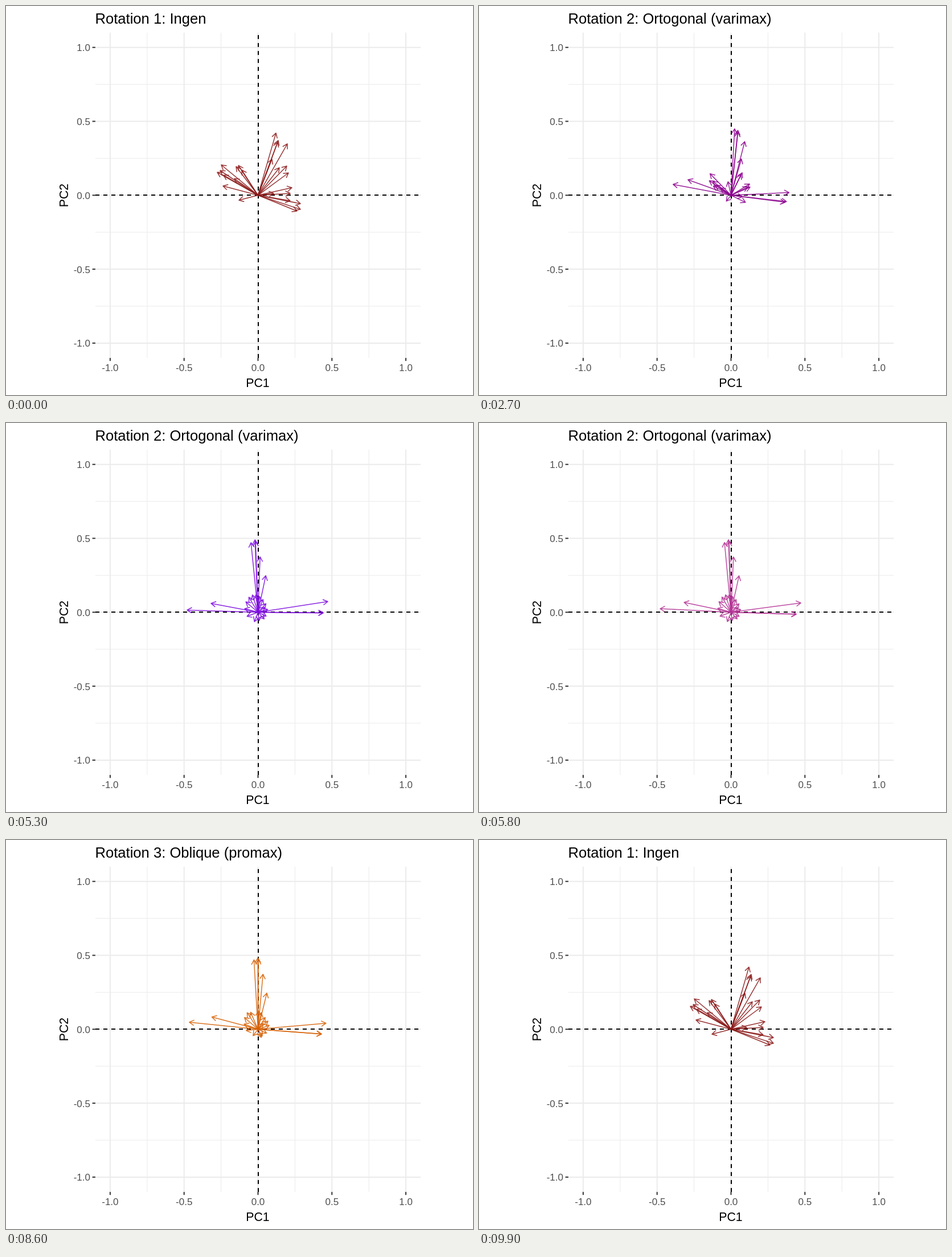
Recreate the animation shown at these times as an HTML page. Size 820x683 px, loop 10000 ms.

```html
<!DOCTYPE html>
<html lang="da">
<head>
<meta charset="utf-8">
<title>Rotation</title>
<style>
  html, body { margin: 0; width: 100%; height: 100%; overflow: hidden; background: #fff; }
  svg { display: block; width: 820px; height: 683px; font-family: "Liberation Sans", Arial, sans-serif; }
  .major { stroke: #ebebeb; stroke-width: 2; }
  .minor { stroke: #ebebeb; stroke-width: 1; }
  .tick { stroke: #333; stroke-width: 2; }
  .zero { stroke: #000; stroke-width: 2; stroke-dasharray: 7 7; shape-rendering: crispEdges; }
  .label { font-size: 17px; fill: #4d4d4d; }
  .axis { font-size: 21.3px; }
  .heading { font-size: 25.6px; }
  #arrows path { fill: none; stroke-width: 1.5; stroke-opacity: .88; stroke-linejoin: round; }
</style>
</head>
<body>
<svg id="chart" viewBox="0 0 820 683"></svg>
<script>
const CX = 442.5, CY = 332.3, UNIT = 259.6, HALF = 285.6;
const LEFT = CX - HALF, RIGHT = CX + HALF, TOP = CY - HALF, BOTTOM = CY + HALF;
const HEAD = 9.6, HEAD_ANGLE = Math.PI / 6;
const FRAME = 100, LOOP_FRAMES = 100, HOLD = 19, MOVE = 14, CYCLE = 33;

// Long arrows: tip before and after the orthogonal rotation.
const longArrows = [
  [[474, 223], [430, 210]], [[478, 236], [437, 205]], [[477, 239], [438, 208]],
  [[494, 242], [446, 235]], [[467, 269], [456, 268]],
  [[517, 347], [565, 313]], [[517, 357], [557, 333]], [[511, 360], [557, 333]],
  [[376, 289], [360, 317]], [[371, 292], [318, 329]]
];

// Short arrows: first tips, in the order in which they later fan out around the centre.
const shortTips = [
  [499, 342], [470, 329], [496, 293], [502, 319], [499, 329], [480, 284], [493, 281], [381, 316],
  [378, 279], [382, 297], [401, 303], [404, 282], [408, 280], [409, 341], [414, 288]
];

// The fan is densest and longest near the vertical axis.
function fanTip(index) {
  const j = index - (shortTips.length - 1) / 2;
  const angle = (108 + 12 * j + j ** 2 + 0.45 * j ** 3) * Math.PI / 180;
  const radius = 14 + 18 * Math.exp(-((j / 4) ** 2));
  return [CX + radius * Math.cos(angle), CY - radius * Math.sin(angle)];
}

// The oblique solution is a slight shear of the orthogonal one.
const shear = ([x, y]) => [x - 0.02 * (y - CY), y + 0.055 * (x - CX)];

const unrotated = [...longArrows.map(pair => pair[0]), ...shortTips];
const orthogonal = [...longArrows.map(pair => pair[1]), ...shortTips.map((_, i) => fanTip(i))];

const states = [
  { title: "Rotation 1: Ingen", color: "#8b1a1a", tips: unrotated },
  { title: "Rotation 2: Ortogonal (varimax)", color: "#6a00ee", tips: orthogonal },
  { title: "Rotation 3: Oblique (promax)", color: "#dc6600", tips: orthogonal.map(shear) }
];

const chart = document.getElementById("chart");

function add(parent, tag, attrs = {}, text = "") {
  const node = document.createElementNS("http://www.w3.org/2000/svg", tag);
  for (const name in attrs) node.setAttribute(name, attrs[name]);
  node.textContent = text;
  return parent.appendChild(node);
}

const line = (cls, x1, y1, x2, y2) => add(chart, "line", { class: cls, x1, y1, x2, y2 });
const label = (cls, x, y, anchor, text, extra) =>
  add(chart, "text", { class: cls, x, y, "text-anchor": anchor, ...extra }, text);

function gridPair(cls, value) {
  const x = CX + value * UNIT, y = CY - value * UNIT;
  line(cls, x, TOP, x, BOTTOM);
  line(cls, LEFT, y, RIGHT, y);
}

const majors = [-1, -0.5, 0, 0.5, 1];
[-0.75, -0.25, 0.25, 0.75].forEach(v => gridPair("minor", v));
majors.forEach(v => gridPair("major", v));
line("zero", LEFT, 332, RIGHT, 332);
line("zero", 443, BOTTOM, 443, TOP);

const arrowGroup = add(chart, "g", { id: "arrows" });
const arrows = unrotated.map(() => add(arrowGroup, "path"));

for (const v of majors) {
  const x = CX + v * UNIT, y = CY - v * UNIT;
  line("tick", x, BOTTOM, x, BOTTOM + 5.3);
  line("tick", LEFT - 5.3, y, LEFT, y);
  label("label", x, 641, "middle", v.toFixed(1));
  label("label", 148, y + 6.5, "end", v.toFixed(1));
}
label("axis", 442, 669, "middle", "PC1");
label("axis", 0, 0, "middle", "PC2", { transform: "translate(108.5 332.5) rotate(-90)" });
const heading = label("heading", 156.5, 31, "start", "");

function arrowPath([x, y]) {
  const angle = Math.atan2(y - CY, x - CX);
  const wing = turn =>
    `${x - HEAD * Math.cos(angle + turn)} ${y - HEAD * Math.sin(angle + turn)}`;
  return `M${CX} ${CY}L${x} ${y}M${wing(HEAD_ANGLE)}L${x} ${y}L${wing(-HEAD_ANGLE)}`;
}

function draw(time) {
  const frame = Math.floor(time / FRAME) % LOOP_FRAMES;
  const index = Math.min(states.length - 1, Math.floor(frame / CYCLE));
  const from = states[index], to = states[(index + 1) % states.length];
  const k = Math.min(1, Math.max(0, (frame - index * CYCLE - HOLD) / MOVE));

  heading.textContent = (k < 0.5 ? from : to).title;
  arrowGroup.style.stroke = `color-mix(in lab, ${from.color}, ${to.color} ${k * 100}%)`;
  arrows.forEach((arrow, i) => {
    const tip = from.tips[i].map((start, axis) => start + (to.tips[i][axis] - start) * k);
    arrow.setAttribute("d", arrowPath(tip));
  });
}

function tick() {
  draw(performance.now());
  requestAnimationFrame(tick);
}
tick();
</script>
</body>
</html>
```
